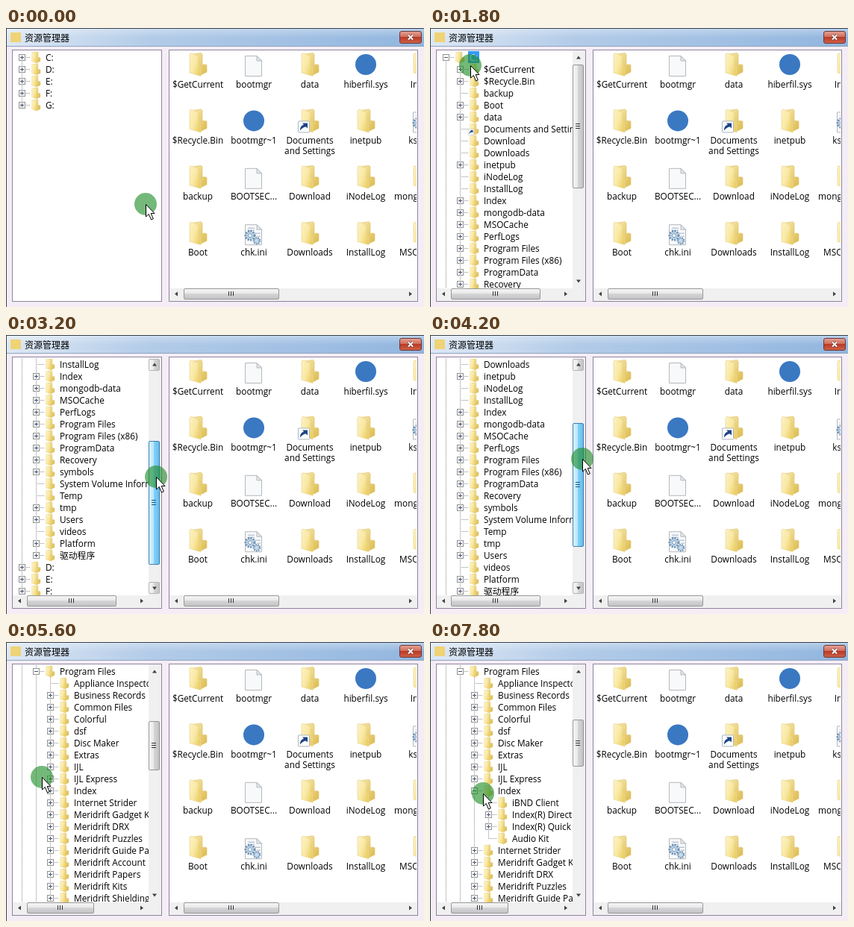
Recreate the animation shown at these times as an HTML page. Size 560 by 374 pixels, loop 8000 ms.

```html
<!DOCTYPE html>
<html lang="zh">
<head>
<meta charset="utf-8">
<title>资源管理器</title>
<style>
html, body { margin: 0; width: 100%; height: 100%; overflow: hidden; background: #f4edf5; }
svg { display: block; width: 560px; height: 374px; }
text { font: 11.8px "Open Sans", "Noto Sans CJK SC", "Noto Sans CJK", sans-serif; fill: #000; white-space: pre; }
text.cjk { font-size: 12px; font-family: "Noto Sans CJK SC", "Noto Sans CJK", sans-serif; }
.label { text-anchor: middle; }
.dots { stroke: #8c8c8c; stroke-dasharray: 1 1; fill: none; shape-rendering: crispEdges; }
.sharp { shape-rendering: crispEdges; }
</style>
</head>
<body>
<svg id="stage" viewBox="0 0 560 374" xmlns="http://www.w3.org/2000/svg">
  <defs>
    <linearGradient id="bar" x2="1" y2="0"><stop stop-color="#dde8f4"/><stop offset=".35" stop-color="#b2cbe8"/><stop offset="1" stop-color="#92b6df"/></linearGradient>
    <linearGradient id="shine" x2="0" y2="1"><stop stop-color="#fff" stop-opacity=".35"/><stop offset="1" stop-color="#fff" stop-opacity="0"/></linearGradient>
    <linearGradient id="red" x2="0" y2="1"><stop stop-color="#e5a397"/><stop offset=".48" stop-color="#cf6a58"/><stop offset=".5" stop-color="#b93a26"/><stop offset="1" stop-color="#cf6248"/></linearGradient>
    <linearGradient id="grayH" x2="0" y2="1"><stop stop-color="#f6f6f6"/><stop offset=".48" stop-color="#e8e8e9"/><stop offset=".5" stop-color="#d5d5d7"/><stop offset="1" stop-color="#c3c3c6"/></linearGradient>
    <linearGradient id="grayV"><stop stop-color="#f6f6f6"/><stop offset=".48" stop-color="#e8e8e9"/><stop offset=".5" stop-color="#d5d5d7"/><stop offset="1" stop-color="#c3c3c6"/></linearGradient>
    <linearGradient id="blueV"><stop stop-color="#dcf3fe"/><stop offset=".48" stop-color="#b5e4fb"/><stop offset=".5" stop-color="#83d0f7"/><stop offset="1" stop-color="#64bdec"/></linearGradient>
    <linearGradient id="cover" x2="1" y2=".6"><stop stop-color="#fcf3c6"/><stop offset=".55" stop-color="#f9e9a4"/><stop offset="1" stop-color="#eccf6c"/></linearGradient>
    <linearGradient id="back" x2="1" y2="1"><stop stop-color="#f6e7ab"/><stop offset="1" stop-color="#dcb94c"/></linearGradient>
    <symbol id="folder" viewBox="0 0 32 34" overflow="visible">
      <path d="M10 3 20 1.500 22 3V17H27L28 18V27L20 31 10 28Z" fill="url(#back)" stroke="#e0c874" stroke-width=".7"/>
      <path d="M5 3 8 2 17 6V19L20 21V32.500L5 28Z" fill="url(#cover)" stroke="#ead68a" stroke-width=".7"/>
    </symbol>
    <symbol id="link" viewBox="0 0 32 34" overflow="visible">
      <use href="#folder" width="32" height="34"/>
      <rect x=".5" y="17.500" width="15" height="15" rx="1" fill="#fff" stroke="#a9b5c1"/>
      <path d="M3 30C3 25 5 23 8 22L6 20H13V27L11 25C8 25 5 27 3 30Z" fill="#1d4486"/>
    </symbol>
    <symbol id="page" viewBox="0 0 32 34" overflow="visible">
      <path d="M4.500 5.500H20L26.500 12V32.500H4.500Z" fill="#f8f9fa" stroke="#b4b8bd"/>
      <path d="M20 5.500V12H26.500Z" fill="#e3e6ea" stroke="#b4b8bd"/>
    </symbol>
    <symbol id="config" viewBox="0 0 32 34" overflow="visible">
      <use href="#page" width="32" height="34"/>
      <path d="M8 10H17M8 13H17M17 17H25M20 21H25M20 25H25" stroke="#9fb3c8"/>
      <circle cx="11" cy="20" r="6" fill="#c5d9ea" stroke="#6e93b5" stroke-width="3" stroke-dasharray="2 1.500"/>
      <circle cx="11" cy="20" r="2.500" fill="#fff" stroke="#6e93b5"/>
      <circle cx="20" cy="27" r="4" fill="#c5d9ea" stroke="#6e93b5" stroke-width="2.500" stroke-dasharray="1.600 1.200"/>
    </symbol>
    <symbol id="badge" viewBox="0 0 32 34" overflow="visible"><circle cx="16" cy="17" r="14" fill="#3a78c2"/></symbol>
    <clipPath id="filesClip"><rect x="219" y="30" width="331" height="318"/></clipPath>
    <clipPath id="treeClip"><rect x="9" y="31" width="182" height="318"/></clipPath>
  </defs>

  <rect width="560" height="374" fill="#f4edf5"/>
  <rect width="560" height="25" fill="url(#bar)"/>
  <rect width="560" height="13" fill="url(#shine)"/>
  <path class="sharp" d="M0 .5H560M.5 0V374" stroke="#39424e"/>
  <path class="sharp" d="M1 24.500H560" stroke="#8fa5c0"/>
  <rect x="6" y="6" width="14" height="13" fill="#efd375"/>
  <text class="cjk" x="25" y="18">资源管理器</text>
  <rect x="527.500" y="4.500" width="29" height="16" rx="2.500" fill="url(#red)" stroke="#6e3a3a"/>
  <path d="M539 9.500 545 15.500M545 9.500 539 15.500" stroke="#6b3430" stroke-width="3.200"/>
  <path d="M539 9.500 545 15.500M545 9.500 539 15.500" stroke="#fff" stroke-width="2"/>
  <g class="sharp" fill="#fff" stroke="#8f849f">
    <rect x="8.500" y="29.500" width="200" height="337"/>
    <rect x="218.500" y="29.500" width="333" height="337"/>
  </g>
  <g id="files" clip-path="url(#filesClip)"></g>
  <g id="filesBar"></g>
  <g id="trees" clip-path="url(#treeClip)"></g>
  <g id="treeBars"></g>
  <g id="pointer">
    <circle r="15" fill="#1e8c28" fill-opacity=".62"/>
    <path d="M.5 .5V17L4.300 13.500 7.500 21 10.300 19.800 7.200 12.500H12Z" fill="#fff" stroke="#000"/>
  </g>
</svg>
<script>
const $ = id => document.getElementById(id);
const LOOP = 8000, STEP = 200, ROW = 16;

// Right pane: one list per row, each entry an icon and a label.
const files = [
  ['folder:$GetCurrent', 'page:bootmgr', 'folder:data', 'badge:hiberfil.sys', 'folder:Index'],
  ['folder:$Recycle.Bin', 'badge:bootmgr~1', 'link:Documents|and Settings', 'folder:inetpub', 'config:ksd.ini'],
  ['folder:backup', 'page:BOOTSEC...', 'folder:Download', 'folder:iNodeLog', 'folder:mongodb-d...'],
  ['folder:Boot', 'config:chk.ini', 'folder:Downloads', 'folder:InstallLog', 'folder:MSOCache']
];
const icon = (kind, x, y, size) =>
  `<use href="#${kind}" x="${x}" y="${y}" width="${size}" height="${size * 34 / 32}"/>`;

$('files').innerHTML = files.map((line, r) => line.map((entry, c) => {
  const [kind, name] = entry.split(':'), x = 257 + 75 * c;
  return icon(kind, x - 16, 32 + 75.4 * r, 32) + name.split('|').map((part, i) =>
    `<text class="label" x="${x}" y="${80 + 75 * r + 14 * i}">${part}</text>`).join('');
}).join('')).join('');

// Tree entries: "+" can be expanded, "-" is expanded, "." is a leaf.
const entries = (depth, list) => list.split(',').map(s => ({ depth, mark: s[0], name: s.slice(1) }));
const expand = (rows, depth, name, children) => rows.flatMap(row =>
  row.depth === depth && row.name === name ? [{ ...row, mark: '-' }, ...children] : [row]);

const drives = entries(0, '+C:,+D:,+E:,+F:,+G:');
const driveOpen = expand(drives, 0, 'C:', entries(1,
  '+$GetCurrent,+$Recycle.Bin,.backup,+Boot,+data,.Documents and Settings,.Download,.Downloads,' +
  '+inetpub,.iNodeLog,.InstallLog,+Index,+mongodb-data,+MSOCache,+PerfLogs,+Program Files,' +
  '+Program Files (x86),+ProgramData,+Recovery,+symbols,.System Volume Information,.Temp,+tmp,' +
  '+Users,.videos,+Platform,+驱动程序'));
const programsOpen = expand(driveOpen, 1, 'Program Files', entries(2,
  '.Appliance Inspector,+Business Records,+Common Files,+Colorful,+dsf,+Disc Maker,+Extras,+IJL,' +
  '+IJL Express,+Index,+Internet Strider,+Meridrift Gadget Kit,+Meridrift DRX,+Meridrift Puzzles,' +
  '+Meridrift Guide Page,+Meridrift Account,+Meridrift Papers,+Meridrift Kits,+Meridrift Shielding,+Meridrift Tools'));
const indexOpen = expand(programsOpen, 2, 'Index', entries(3,
  '.iBND Client,+Index(R) Direct,+Index(R) Quick Start,.Audio Kit'));

function drawTree(rows) {
  const last = [];
  let lines = '', items = '';
  rows.forEach(({ depth, mark, name }, i) => {
    const x = 21 + 19 * depth, y = 39 + ROW * i, cx = x + .5, cy = y + .5;
    const from = last[depth] ?? (depth ? y - 8 : y);
    last.length = depth;
    last[depth] = y;
    lines += `M${cx} ${from}V${y}M${x} ${cy}H${x + 12}`;
    if (mark !== '.') items +=
      `<rect class="sharp" x="${cx - 4}" y="${cy - 4}" width="8" height="8" fill="#fff" stroke="#919191"/>` +
      `<path class="sharp" d="M${x - 2} ${cy}h5${mark === '+' ? `M${cx} ${y - 2}v5` : ''}" stroke="#44546e"/>`;
    items += icon(name.startsWith('Documents') ? 'link' : 'folder', x + 11, y - 8, 16);
    const selected = name === 'C:' && mark === '-';
    if (selected) items += `<rect x="51" y="${y - 8}" width="15" height="16" fill="#3399ff"/>`;
    items += `<text x="${x + 32}" y="${y + 5}"${selected ? ' style="fill:#fff"' : ''}>${name}</text>`;
  });
  return `<g><path class="dots" d="${lines}"/>${items}</g>`;
}
$('trees').innerHTML = [drives, driveOpen, programsOpen, indexOpen].map(drawTree).join('');
const trees = [...$('trees').children];

const arrow = (x, y, turn) =>
  `<path d="M-3 2 0 -2 3 2Z" fill="#404040" transform="translate(${x} ${y}) rotate(${turn})"/>`;

function barH(left, right, from, to) {
  const mid = Math.round((from + to) / 2) - 1;
  return `<rect x="${left}" y="349" width="${right - left}" height="17" fill="#f0f0f0"/>` +
    arrow(left + 9, 356.5, -90) + arrow(right - 9, 356.5, 90) +
    `<rect x="${from + .5}" y="349.5" width="${to - from - 1}" height="14" rx="1.500" fill="url(#grayH)" stroke="#979797"/>` +
    [-3, 0, 3].map(d => `<path d="M${mid + d + .5} 353V359" stroke="#333"/>`).join('');
}
function barV(top, length, hot) {
  const mid = Math.round(top + length / 2) - 1;
  const button = y => `<rect x="191.500" y="${y}" width="14" height="15" rx="1.500" fill="url(#grayV)" stroke="#b5b5b5"/>`;
  return `<rect x="191" y="30" width="17" height="319" fill="#f0f0f0"/>` +
    (hot ? button(32.5) + button(331.5) : '') + arrow(199, 39.5, 0) + arrow(199, 339.5, 180) +
    `<rect x="191.500" y="${top + .5}" width="14" height="${length - 1}" rx="1.500"` +
    ` fill="url(#${hot ? 'blueV' : 'grayV'})" stroke="${hot ? '#3c7fb1' : '#979797'}"/>` +
    [-3, 0, 3].map(d => `<path d="M195 ${mid + d + .5}H201" stroke="${hot ? '#1d5a85' : '#333'}"/>`).join('');
}
$('filesBar').innerHTML = barH(219, 551, 238, 366);

// Pointer path: time, x, y.
const path = [
  [0, 187, 236], [400, 470, 316], [600, 533, 337], [1000, 120, 100], [1200, 29, 47], [1400, 19, 39],
  [1700, 24, 41], [2200, 176, 86], [2400, 191, 92], [2600, 196, 93], [3200, 201, 190], [3600, 202, 185],
  [4200, 204, 166], [4400, 190, 166], [4800, 58, 169], [5000, 44, 168], [5200, 44, 168], [5600, 48, 181],
  [6200, 58, 193], [7200, 58, 192], [7800, 71, 203]
];
function pointerAt(t) {
  const i = Math.max(1, path.findIndex(p => p[0] >= t));
  const [t0, x0, y0] = path[i - 1], [t1, x1, y1] = path[i];
  const k = (t - t0) / (t1 - t0);
  return [Math.round(x0 + (x1 - x0) * k), Math.round(y0 + (y1 - y0) * k)];
}

function stateAt(t) {
  if (t < 1600) return { view: 0, scroll: 0 };
  if (t < 5200) {
    const top = Math.max(49, pointerAt(Math.min(t, 4200))[1] - 48);
    return { view: 1, scroll: Math.round((top - 49) / 8.5), top, length: 166, right: 147, hot: t >= 2400 && t < 4600 };
  }
  return t < 6600
    ? { view: 2, scroll: 16, top: 106, length: 66, right: 117 }
    : { view: 3, scroll: 16, top: 104, length: 63, right: 104 };
}

function render(t) {
  const s = stateAt(t);
  trees.forEach((tree, i) => tree.style.display = i === s.view ? '' : 'none');
  trees[s.view].setAttribute('transform', `translate(0 ${-ROW * s.scroll})`);
  $('treeBars').innerHTML = s.view
    ? `<rect x="191" y="349" width="17" height="17" fill="#f0f0f0"/>` +
      barH(9, 191, 28, s.right + 1) + barV(s.top, s.length, s.hot)
    : '';
  $('pointer').setAttribute('transform', `translate(${pointerAt(t)})`);
}

const start = performance.now();
let shown = -1;
function tick() {
  const t = Math.floor((performance.now() - start) % LOOP / STEP) * STEP;
  if (t !== shown) render(shown = t);
  requestAnimationFrame(tick);
}
tick();
</script>
</body>
</html>
```
